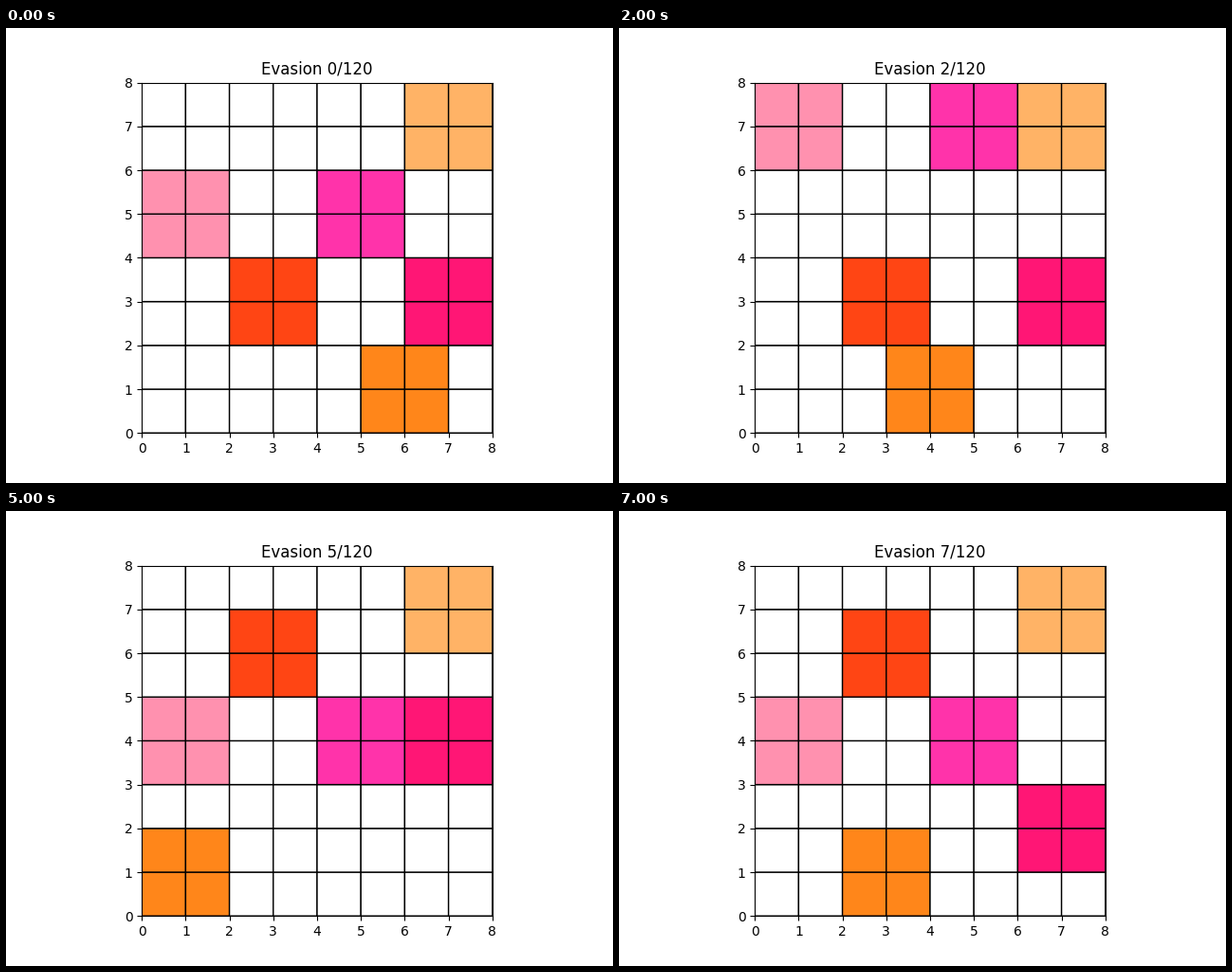
A matplotlib script for the animation above (8 s loop, 640x480 px).

```python
import matplotlib.pyplot as plt
import numpy as np
from matplotlib.animation import FuncAnimation
from matplotlib.colors import ListedColormap

SIZE = 8
STEPS = 8
TOTAL = 120
COLORS = ["#ffffff", "#ff91af", "#ff4514", "#ff33aa",
          "#ff1675", "#ffb366", "#ff861a"]


def bounce(start, heading, low, high, step):
    """Position after some unit steps between two walls."""
    span = high - low
    phase = start - low if heading > 0 else 2 * span - (start - low)
    pos = (phase + step) % (2 * span)
    return low + min(pos, 2 * span - pos)


def block_corners(step):
    """Lower left corner of each 2x2 block, in colour order."""
    return [
        (0, bounce(4, 1, 2, 6, step)),
        (2, bounce(2, -1, 1, 6, step)),
        (4, bounce(4, 1, 2, 6, step)),
        (6, bounce(2, -1, 1, 4, step)),
        (6, 6),
        (bounce(5, -1, 0, 6, step), 0),
    ]


def board(step):
    cells = np.zeros((SIZE, SIZE))
    for color, (x, y) in enumerate(block_corners(step), start=1):
        cells[y:y + 2, x:x + 2] = color
    return cells


fig, ax = plt.subplots(figsize=(6.4, 4.8), dpi=100)
# Keeps the tick labels off exact half pixels.
fig.subplots_adjust(bottom=0.10998)
mesh = ax.pcolor(board(0), cmap=ListedColormap(COLORS), edgecolors="k",
                 linewidths=1, vmin=-0.5, vmax=len(COLORS) - 0.5)
ax.set_aspect("equal")
ax.set_xticks(range(SIZE + 1))
ax.set_yticks(range(SIZE + 1))
title = ax.set_title("", pad=6.7)


def update(step):
    mesh.set_array(board(step))
    title.set_text(f"Evasion {step}/{TOTAL}")
    return mesh, title


anim = FuncAnimation(fig, update, frames=STEPS, interval=1000,
                     repeat=True, repeat_delay=0)
plt.show()
```
